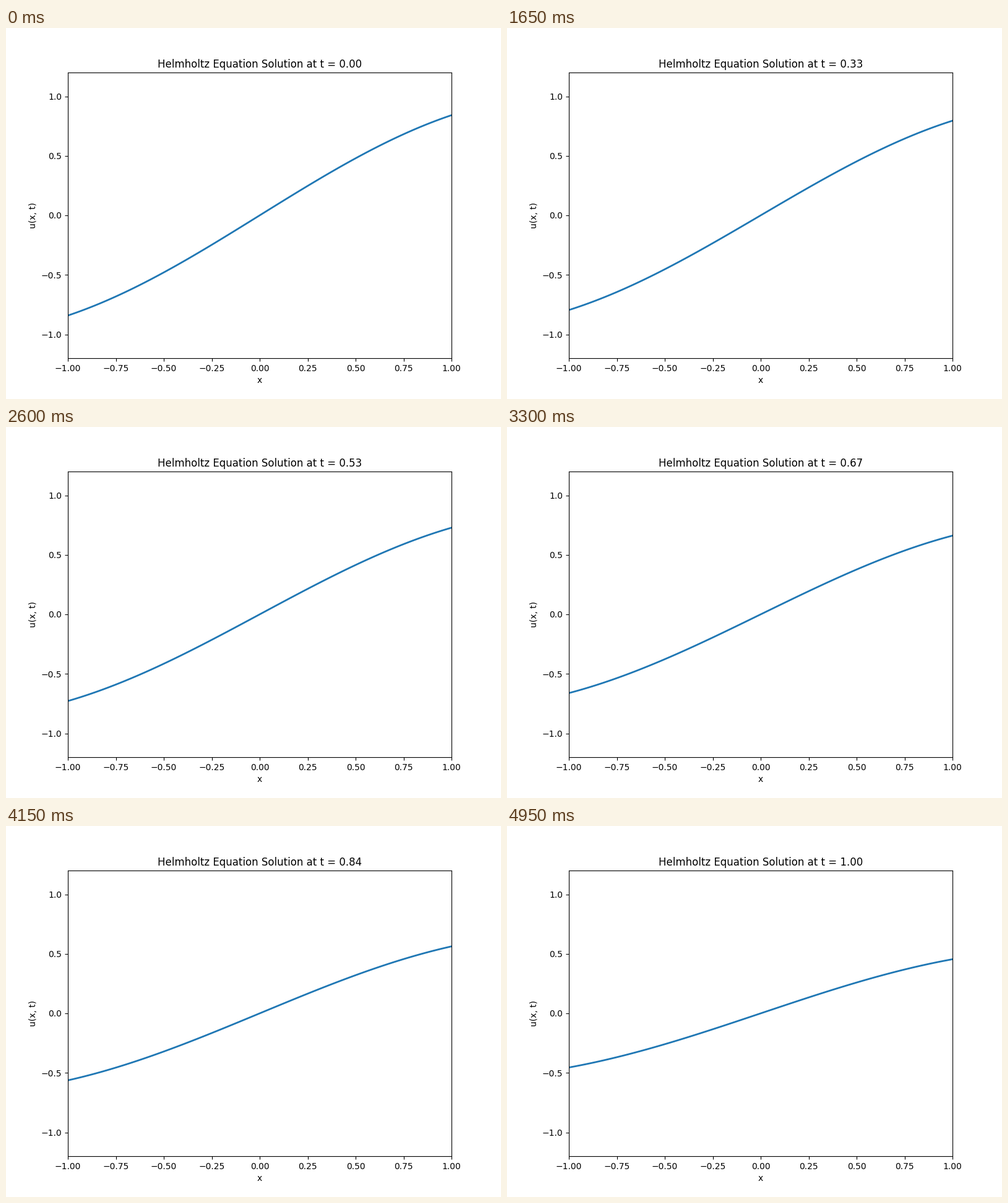
Write a matplotlib script that moves like this. It is 800 by 600 pixels and loops after 5 s.

```python
import numpy as np
import matplotlib.pyplot as plt
from matplotlib.animation import FuncAnimation

FRAMES = 100
INTERVAL = 50  # ms

x = np.linspace(-1, 1, 100)
times = np.linspace(0, 1, FRAMES)

fig, ax = plt.subplots(figsize=(8, 6), dpi=100)
line, = ax.plot([], [], lw=2)
ax.set_xlim(-1, 1)
ax.set_ylim(-1.2, 1.2)
ax.set_xlabel("x")
ax.set_ylabel("u(x, t)")
title = ax.set_title("")


def wave(x, t):
    return np.sin(x) * np.cos(t)


def update(i):
    t = times[i]
    line.set_data(x, wave(x, t))
    title.set_text(f"Helmholtz Equation Solution at t = {t:.2f}")
    return line, title


anim = FuncAnimation(fig, update, frames=FRAMES, interval=INTERVAL,
                     repeat=True, repeat_delay=0, blit=False)

plt.show()
```
